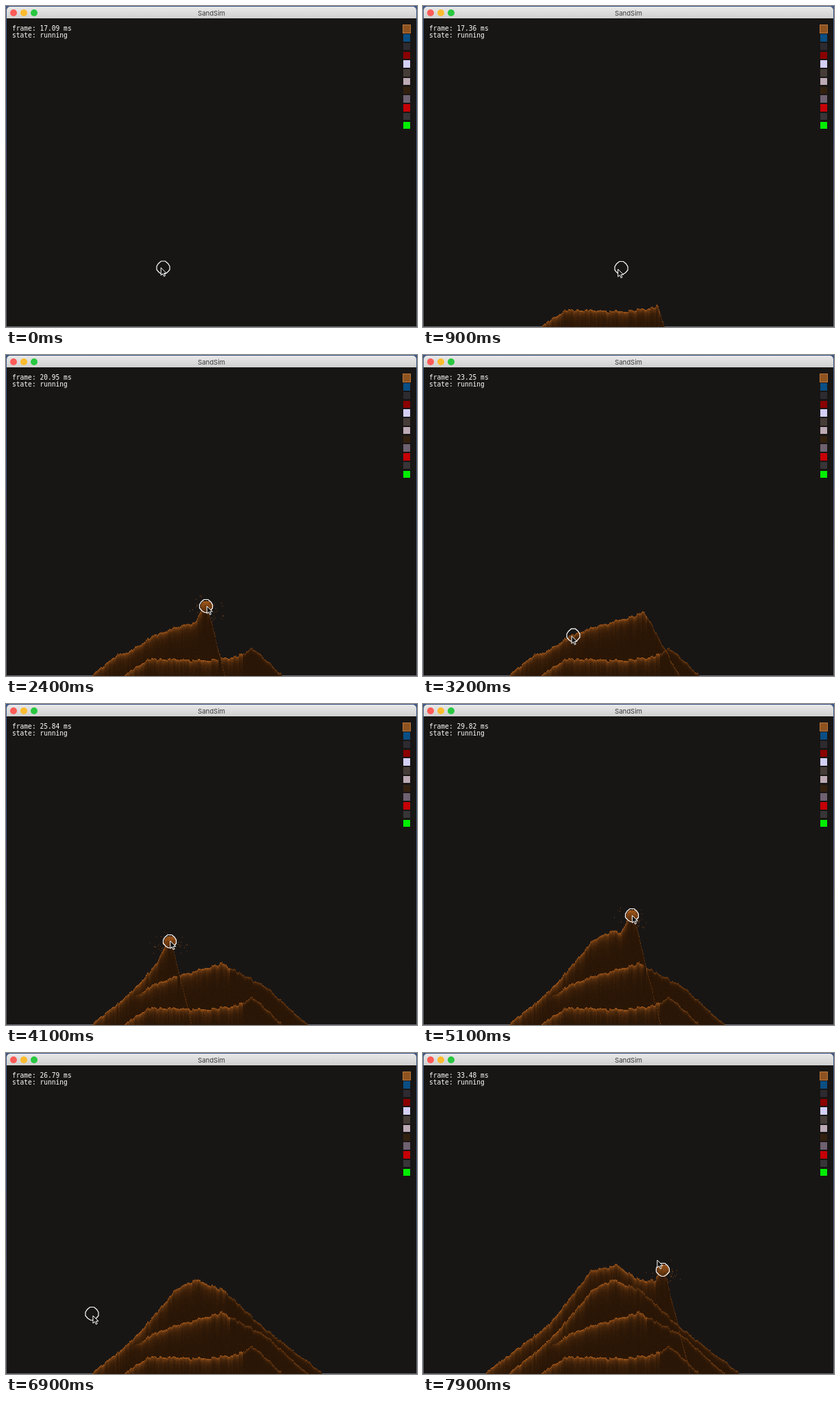
Recreate the animation shown at these times as an HTML page with a canvas. Size 600 by 468 pixels, loop 8 s.

```html
<!DOCTYPE html>
<html lang="en">
<head>
<meta charset="utf-8">
<title>SandSim</title>
<style>
  html, body { margin: 0; width: 100%; height: 100%; overflow: hidden; background: #3d5788; }
  #stage {
    position: relative; width: 600px; height: 468px; overflow: hidden;
    background: linear-gradient(#3d5788 20%, #62666f);
  }
  #window { position: absolute; inset: 1px; border-radius: 5px 5px 0 0; background: #181615; overflow: hidden; }
  #bar {
    height: 17px; background: linear-gradient(#e9e9e9, #d0d0d0); color: #3a3a3a;
    font: 9.6px/19px Inter, "Open Sans", sans-serif; text-align: center;
  }
  #bar i { position: absolute; top: 4px; width: 10px; height: 10px; border-radius: 50%; }
  canvas, svg { position: absolute; left: 0; top: 0; width: 600px; height: 468px; }
  #info {
    position: absolute; left: 9px; top: 28px; margin: 0; color: #fff;
    font: 9.6px/10.3px "DejaVu Sans Mono", monospace;
  }
  #palette b { position: absolute; left: 580px; width: 10px; height: 10.5px; }
  #palette b:first-child { box-shadow: 0 0 0 1px #b9763a; }
</style>
</head>
<body>
<div id="stage">
  <div id="window">
    <div id="bar">
      <i style="left:5px;background:#fc5b57"></i>
      <i style="left:20px;background:#fdbc2e"></i>
      <i style="left:35px;background:#28c840"></i>
      SandSim
    </div>
  </div>
  <canvas id="sand" width="600" height="467"></canvas>
  <pre id="info">frame: <span id="ms">17.09</span> ms
state: running</pre>
  <div id="palette"></div>
  <svg viewBox="0 0 600 468">
    <path id="brush" d="M-3 -9.5H3L7 -6 9.5 -2V3L6 7 2 9.5H-2L-6 7 -9.5 3V-2L-7 -6Z" fill="none" stroke="#fff" stroke-width="1.2"/>
    <path id="arrow" d="M0 0V11L2.6 8.6 4.4 12.6 6.2 11.8 4.5 8H8Z" fill="#111" stroke="#fff" stroke-width="1"/>
  </svg>
</div>
<script>
const LOOP = 8000, STEP = 100, WIDTH = 600, HEIGHT = 467, FLOOR = 470;
const BRUSH = 9, LEAD = 12, GROW = 300, SETTLE = 800;
const $ = id => document.getElementById(id);
const ctx = $('sand').getContext('2d');
const image = ctx.createImageData(WIDTH, HEIGHT);

const mix = (a, b, k) => a + (b - a) * k;
const clamp = v => Math.min(1, Math.max(0, v));
function rand(a, b = 0) {
  let h = Math.imul(a + 1, 0x9E3779B1) ^ Math.imul(b + 7, 0x85EBCA6B);
  h = Math.imul(h ^ h >>> 15, 0x2C1B3C6D);
  h = Math.imul(h ^ h >>> 13, 0x297A2D39);
  return ((h ^ h >>> 16) >>> 0) / 2 ** 32;
}

['#8f5320', '#0a4e84', '#2d2b30', '#8b0000', '#d4d0f5', '#463d38',
 '#bcaab4', '#32200f', '#6e6170', '#c60006', '#373537', '#00ee00'].forEach((color, i) => {
  const swatch = document.createElement('b');
  swatch.style.cssText = `top:${28.3 + i * 12.75}px;background:${color}`;
  $('palette').append(swatch);
});

// Pouring time and settled outline of each layer of sand, oldest first.
const layers = [
  { from: 100, to: 750, falls: true,
    outline: [[170, 467], [208, 441], [290, 444], [333, 439], [361, 426], [404, 467]] },
  { from: 1200, to: 2700,
    outline: [[122, 467], [165, 433], [177, 433], [213, 408], [250, 395], [315, 377], [378, 410], [441, 467]] },
  { from: 3400, to: 5500,
    outline: [[122, 467], [165, 433], [188, 413], [248, 343], [276, 329], [318, 345], [378, 401], [464, 467]] },
  { from: 7050, to: 8000,
    outline: [[88, 467], [165, 408], [184, 394], [245, 316], [283, 308], [315, 330], [345, 330]] }
];

// Stops of the brush: time, x, y.
const path = [
  [0, 229.5, 381.5], [100, 202, 382], [700, 360, 382], [900, 289.5, 382],
  [1200, 168, 425], [2400, 292, 366], [2700, 323, 368],
  [3400, 178, 425], [4100, 239, 346], [5100, 305, 308], [5500, 317, 314],
  [6900, 125.5, 380], [7100, 150, 430], [7600, 264, 314], [7900, 350, 316], [8000, 283, 199]
];
const timings = [[0, 17.09], [900, 17.36], [2400, 20.95], [4100, 25.84],
                 [5100, 29.82], [6900, 26.79], [7900, 33.48]];

// Value number `n` of a list of stops, interpolated at `at`.
function along(stops, at, n = 1) {
  let i = 0;
  while (i < stops.length - 2 && at >= stops[i + 1][0]) i++;
  const a = stops[i], b = stops[i + 1];
  return mix(a[n], b[n], clamp((at - a[0]) / (b[0] - a[0])));
}
const brushAt = t => [along(path, t), along(path, t, 2)];

const bump = x => (rand(x >> 2, 1) - .5) * 3 + (rand(x >> 1, 2) - .5) * 2;

// Behind the brush lies the outline, at the brush a cone with a steep front;
// when pouring stops the front slumps into the outline.
function heap({ from, to, falls, outline }, t) {
  const [bx, by] = brushAt(Math.min(t, to));
  const ends = [outline[0][0], outline.at(-1)[0]];
  const settled = x => x < ends[0] || x > ends[1] ? FLOOR : along(outline, x);
  const tip = falls ? settled(bx) : by - BRUSH;
  const grown = clamp((t - from) / GROW), slump = clamp((t - to) / SETTLE);
  const tops = Float32Array.from({ length: WIDTH }, (_, x) => {
    const cone = tip + (x < bx ? (bx - x) * 2 : (x - bx) * 4);
    const poured = x < bx ? Math.min(cone, settled(x)) : cone;
    const y = mix(mix(FLOOR, poured, grown), settled(x), slump);
    return y < HEIGHT ? y + bump(x) : FLOOR + 30;
  });
  return { tops, crest: bx };
}

function plot(x, y, light) {
  if (x < 0 || x >= WIDTH || y < 0 || y >= HEIGHT) return;
  image.data.set([42 + 128 * light, 22 + 70 * light, 6 + 22 * light, 255], (y * WIDTH + x) * 4);
}

// Light of one heap at a depth below its surface; a newer heap close above hides it.
function glow(heaps, i, x, depth) {
  const { tops, crest } = heaps[i];
  if (x > crest + 3) return .65 * Math.exp(-depth / 2);
  const gap = i + 1 < heaps.length ? tops[x] - heaps[i + 1].tops[x] : -1;
  const shown = gap < 0 ? 1 : clamp((gap - 10) / 10);
  const reach = 8 * (.75 + .5 * rand(x >> 1, i));
  return shown * (.45 * Math.exp(-depth / 2.5) + .5 * Math.exp(-depth / reach));
}

function drawSand(t, bx, by) {
  image.data.fill(0);
  const heaps = layers.filter(l => t >= l.from).map(l => heap(l, t));
  const pouring = layers.find(l => t >= l.from && t <= l.to);
  for (let x = 0; x < WIDTH; x++) {
    const top = Math.min(HEIGHT, ...heaps.map(h => h.tops[x]));
    for (let y = Math.ceil(top); y < HEIGHT; y++) {
      let light = 0;
      heaps.forEach((h, i) => {
        if (y >= h.tops[x]) light = Math.max(light, glow(heaps, i, x, y - h.tops[x]));
      });
      plot(x, y, light * (.75 + .5 * rand(x, y)) + (rand(y, x) - .5) * .06);
    }
  }
  if (!pouring) return;
  const buried = (x, y) => heaps.some(h => y > h.tops[x]);
  if (pouring.falls) drawFall(t, by, buried);
  else drawSplash(t, bx, by, buried);
}

function drawFall(t, by, buried) {
  for (let i = 0; i < 150; i++) {
    const age = rand(i, t);
    const x = Math.round(along(path, Math.max(100, t - age * 120)) + (rand(i + 200, t) - .5) * 18);
    const y = Math.round(by + (rand(i + 400, t) - .5) * 16 + age * age * 65);
    if (!buried(x, y)) plot(x, y, .3 + .6 * rand(i, 5));
  }
}

function drawSplash(t, bx, by, buried) {
  for (let dx = -BRUSH; dx <= BRUSH; dx++) {
    for (let dy = -BRUSH; dy <= BRUSH; dy++) {
      if (Math.hypot(dx, dy) > BRUSH) continue;
      const x = Math.round(bx + dx), y = Math.round(by + dy);
      plot(x, y, (.6 - dy * .04) * (.7 + .6 * rand(x, y + t)));
    }
  }
  for (let i = 0; i < 60; i++) {
    const angle = rand(i, t) * Math.PI * 2, radius = BRUSH + 20 * rand(i + 200, t) ** 2;
    const x = Math.round(bx + Math.cos(angle) * radius);
    const y = Math.round(by + Math.sin(angle) * radius * .75 + 4);
    if (!buried(x, y)) plot(x, y, .3 + .6 * rand(i, 5));
  }
}

function place(id, [x, y]) {
  $(id).setAttribute('transform', `translate(${x} ${y})`);
}

function draw(t) {
  const brush = brushAt(t);
  drawSand(t, ...brush);
  ctx.putImageData(image, 0, 0);
  place('brush', brush);
  place('arrow', brushAt(t + LEAD));
  $('ms').textContent = along(timings, t).toFixed(2);
}

const start = performance.now();
let shown = -1;
function tick() {
  const t = Math.floor((performance.now() - start) % LOOP / STEP) * STEP;
  if (t !== shown) draw(shown = t);
  requestAnimationFrame(tick);
}
tick();
</script>
</body>
</html>
```
